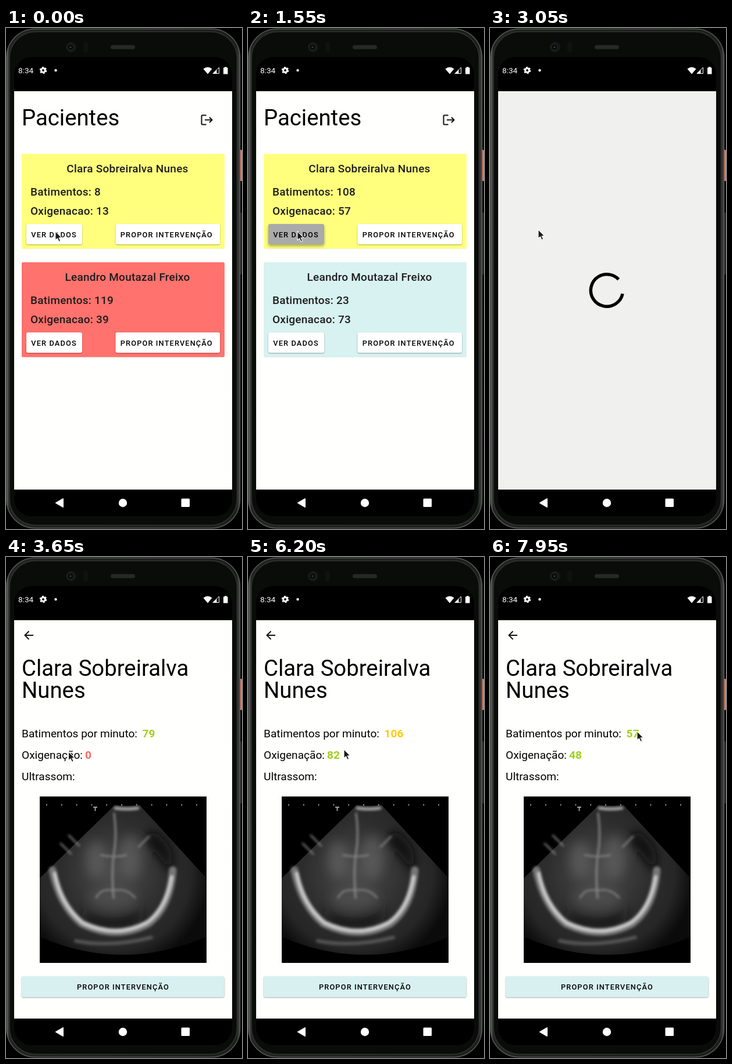
An HTML page for the animation above (8000 ms loop, 406 by 864 pixels).

```html
<!DOCTYPE html>
<html lang="pt">
<head>
<meta charset="utf-8">
<style>
  html, body { margin: 0; width: 100%; height: 100%; overflow: hidden; background: #000; }
  svg { display: block; }
  text { font-family: Roboto, sans-serif; white-space: pre; }
  .title { font-size: 38.3px; }
  .card text { font-size: 19px; font-weight: 500; letter-spacing: .23px; fill: #1d1d1d; }
  .card .button { font-size: 12.77px; letter-spacing: 1.14px; fill: #000; }
  .button { font-size: 12.77px; font-weight: 500; letter-spacing: 1.14px; }
  .detail { font-size: 19.1px; }
  .value { font-weight: 700; }
  .raised { filter: drop-shadow(0 1px 1px #0005); }
  .flat { filter: drop-shadow(0 .5px .7px #0003); }
  .line { fill: none; stroke: #111; stroke-width: 2; }
</style>
</head>
<body>
<svg width="406" height="864" viewBox="0 0 406 864">
  <defs>
    <clipPath id="screenClip"><rect x="14" y="109" width="375" height="687"/></clipPath>
    <clipPath id="photoClip"><rect x="58" y="413" width="287" height="287"/></clipPath>
    <linearGradient id="rim">
      <stop offset="0" stop-color="#6b6d6b"/><stop offset=".012" stop-color="#222422"/>
      <stop offset=".985" stop-color="#1c1e1c"/><stop offset="1" stop-color="#4a4c4a"/>
    </linearGradient>
    <radialGradient id="tissue" gradientUnits="userSpaceOnUse" cx="186" cy="545" r="165">
      <stop offset="0" stop-color="#4c4c4c"/><stop offset=".55" stop-color="#2d2d2d"/>
      <stop offset=".8" stop-color="#262626"/><stop offset="1" stop-color="#0b0b0b"/>
    </radialGradient>
    <filter id="soft" x="-40%" y="-40%" width="180%" height="180%"><feGaussianBlur stdDeviation="9"/></filter>
    <filter id="haze" x="-20%" y="-20%" width="140%" height="140%"><feGaussianBlur stdDeviation="2"/></filter>
  </defs>

  <!-- phone body -->
  <rect width="406" height="864"/>
  <rect x="401" y="210" width="5" height="54" rx="1.5" fill="#ed7660"/>
  <rect x="401" y="318" width="5" height="107" rx="1.5" fill="#232323"/>
  <rect x="1" y="1.5" width="401.5" height="861" rx="49" fill="url(#rim)" stroke="#555755" stroke-width="1.5"/>
  <rect x="6" y="6.5" width="391.5" height="851" rx="45" fill="#0a0c0a" stroke="#303230" stroke-width="1.5"/>
  <rect x="14" y="50" width="375" height="792" rx="30"/>
  <circle cx="112" cy="33" r="9" fill="#161716"/>
  <circle cx="111" cy="33" r="5.5" fill="#090a0c" stroke="#2c2d2e"/>
  <circle cx="111" cy="33" r="1.6" fill="#3b3d42"/>
  <rect x="133" y="24" width="8" height="18" rx="3" fill="#101110"/>
  <rect x="180" y="29.500" width="42" height="7" rx="3.500" fill="#272827"/>

  <!-- status and navigation bars -->
  <g fill="#fff">
    <text x="21" y="78" font-size="13.6">8:34</text>
    <circle cx="64" cy="73" r="3.4" fill="none" stroke="#fff" stroke-width="3"/>
    <circle cx="64" cy="73" r="5.3" fill="none" stroke="#fff" stroke-width="2" stroke-dasharray="2.8 2.75"/>
    <circle cx="85.500" cy="73" r="2.2"/>
    <path d="M339.500 70.500Q347 64.500 354.500 70.500L347 79.500Z"/>
    <path d="M356 78.500L366.500 68V78.500Z" fill="none" stroke="#fff"/>
    <path d="M355.500 79L362.500 72V79Z"/>
    <path d="M374 68.500h2v-1.500h3.500v1.500h2V79.500h-7.500Z"/>
    <path d="M86 819L98 812V826Z" stroke="#fff" stroke-width="2" stroke-linejoin="round"/>
    <circle cx="201" cy="819" r="7.2"/>
    <rect x="301.500" y="811.500" width="14.500" height="14.500" rx="1.5"/>
  </g>

  <g clip-path="url(#screenClip)">
    <rect x="14" y="109" width="375" height="687" fill="#f0f0ee"/>
    <circle id="spinner" cx="201" cy="452.500" r="27.700" fill="none" stroke="#000" stroke-width="5.5" pathLength="360"/>
    <g id="list"></g>
    <g id="details">
      <rect x="14" y="109" width="375" height="687" fill="#fffffd"/>
      <path class="line" d="M47 135H33M39.500 128L32.500 135L39.500 142"/>
      <text class="title" x="27" y="205">Clara Sobreiralva</text>
      <text class="title" x="27" y="243">Nunes</text>
      <g class="detail">
        <text x="27" y="310.500">Batimentos por minuto:</text>
        <text x="27" y="347.500">Oxigenação:</text>
        <text x="27" y="385">Ultrassom:</text>
        <text class="value" id="pulse" x="234.500" y="310.500"></text>
        <text class="value" id="oxygen" x="136" y="347.500"></text>
      </g>
      <g clip-path="url(#photoClip)">
        <rect x="58" y="413" width="287" height="287"/>
        <path d="M187 428L58 554V655Q200 717 345 655V554L230 428Q208 431 187 428Z" fill="url(#tissue)"/>
        <g filter="url(#soft)">
          <path d="M250 470Q298 500 282 545Q262 510 238 492Z" fill="#0a0a0a"/>
          <ellipse cx="155" cy="522" rx="18" ry="32" fill="#666" opacity=".6"/>
          <ellipse cx="214" cy="518" rx="20" ry="38" fill="#666" opacity=".6"/>
          <ellipse cx="184" cy="588" rx="42" ry="20" fill="#555" opacity=".6"/>
          <path d="M130 610Q185 640 240 606L225 632Q180 648 138 630Z" fill="#151515"/>
        </g>
        <g filter="url(#haze)" fill="none" stroke-linecap="round">
          <path d="M80 540Q92 600 130 632Q190 662 245 632Q282 604 287 540" stroke="#777" stroke-width="13"/>
          <path d="M84 546Q94 600 132 631Q190 659 243 630Q276 606 285 552" stroke="#c9c9c9" stroke-width="6"/>
          <path d="M120 662Q180 674 250 656" stroke="#555" stroke-width="6"/>
          <path d="M186 442Q191 480 186 510T185 588" stroke="#8a8a8a" stroke-width="3"/>
          <path d="M163 514Q186 519 207 514M155 588Q163 571 184 575Q208 570 222 588M94 494L112 512M108 480L126 498M228 500L246 482" stroke="#858585" stroke-width="2.5"/>
          <path d="M188 433Q208 436 227 433" stroke="#aaa" stroke-width="5"/>
        </g>
        <path d="M69 427.500H340" stroke="#aaa" stroke-width="2" stroke-dasharray="2 23.800"/>
        <path d="M150 431.500H157M153.500 431.500V438" stroke="#aaa" stroke-width="1.8"/>
      </g>
      <rect class="raised" x="27" y="723" width="348.500" height="36" rx="3" fill="#d8f1f0"/>
      <text class="button" x="201.500" y="745.500" text-anchor="middle">PROPOR INTERVENÇÃO</text>
    </g>
  </g>
  <path id="cursor" d="M0 0V15.500L3.500 12.300L6 18L8.700 16.800L6.200 11.200H10.800Z" fill="#1a1a1a" stroke="#fff" stroke-width="1.1" stroke-linejoin="round"/>
</svg>

<script>
const LOOP = 8000, STEP = 50;
const GREEN = '#a0d11a', YELLOW = '#ffc90e', RED = '#f86a62';
const $ = id => document.getElementById(id);
const clamp = v => Math.min(1, Math.max(0, v));
const ease = v => v * v * (3 - 2 * v);

const button = (x, width, label) => `
  <rect class="raised" x="${x}" y="338" width="${width}" height="35" rx="3" fill="#fff"/>
  <text class="button" x="${x + 8.3}" y="360.5">${label}</text>`;

const card = (id, y, name) => `
  <g class="card" id="${id}" transform="translate(0 ${y})">
    <rect class="flat" x="27" y="217" width="349" height="163.500" rx="2.500"/>
    <text x="209" y="248.500" text-anchor="middle">${name}</text>
    <text x="42" y="288.800"></text>
    <text x="42" y="321.500"></text>
    ${button(35, 96, 'VER DADOS')}${button(188.5, 179.5, 'PROPOR INTERVENÇÃO')}
  </g>`;

$('list').innerHTML = `
  <rect x="-30" y="60" width="470" height="790" fill="#fffffd"/>
  <text class="title" x="27" y="168">Pacientes</text>
  <path class="line" d="M344.500 150.500H338Q336.500 150.500 336.500 152V165Q336.500 166.500 338 166.500H344.500M342 158.500H354M350 154L354.500 158.500L350 163"/>
  ${card('first', 0, 'Clara Sobreiralva Nunes')}
  ${card('second', 187, 'Leandro Moutazal Freixo')}`;

const pressed = $('first').querySelectorAll('rect')[1];

// Cursor path: time, x, y
const path = [
  [0, 85, 350.5], [2200, 85, 350.5], [2400, 83, 347.5], [3400, 83, 347.5],
  [3650, 107.5, 335.5], [4000, 148, 325], [4100, 148, 325], [4650, 142, 349],
  [4750, 142, 349], [5300, 140, 347], [5800, 140, 347], [6000, 127, 436],
  [6200, 165, 331.5], [6400, 260, 254], [6650, 296, 320], [6850, 200, 361],
  [7050, 98, 300], [7250, 180, 213], [7400, 295, 262], [7550, 153, 345],
  [7950, 253, 300.5], [8000, 253, 300.5]
];

// Readings on the details screen: start, pulse, colour, oxygen, colour
const readings = [
  [0, 79, GREEN, 0, RED], [4150, 64, GREEN, 71, GREEN],
  [4800, 106, YELLOW, 82, GREEN], [7100, 57, GREEN, 48, GREEN]
];

function fillCard(id, colour, pulse, oxygen) {
  const [, pulseText, oxygenText] = $(id).querySelectorAll('text');
  $(id).querySelector('rect').setAttribute('fill', colour);
  pulseText.textContent = 'Batimentos: ' + pulse;
  oxygenText.textContent = 'Oxigenacao: ' + oxygen;
}

function fillValue(id, value, colour) {
  $(id).textContent = value;
  $(id).setAttribute('fill', colour);
}

function drawList(t) {
  const list = $('list');
  const scale = 1 + Math.max(0, t - 2040) * .00088;
  list.style.display = t < 2160 ? '' : 'none';
  list.setAttribute('opacity', clamp(1 - (t - 2060) / 100));
  list.setAttribute('transform',
    t < 2050 ? '' : `translate(201.5 452.5) scale(${scale}) translate(-201.5 -452.5)`);
  fillCard('first', '#ffff7d', ...(t < 500 ? [8, 13] : [108, 57]));
  fillCard('second', ...(t < 550 ? ['#ff726d', 119, 39] : ['#d8f1f1', 23, 73]));

  const press = clamp((t - 1300) / 250) * clamp(1 - (t - 2050) / 120);
  const grey = 255 - 85 * press;
  pressed.setAttribute('fill', `rgb(${grey},${grey},${grey})`);
  pressed.style.filter = `drop-shadow(0 ${1 + 2 * press}px ${1 + 1.5 * press}px #0005)`;
}

function drawSpinner(t) {
  const turns = (t - 2384) / 1332, cycle = Math.floor(turns), p = turns - cycle;
  const head = ease(clamp(2 * p)), tail = ease(clamp(2 * p - 1));
  const start = 12 + .219 * (t - 3050) + 295 * (cycle + tail);
  const spinner = $('spinner');
  spinner.style.display = t >= 2150 && t < 3150 ? '' : 'none';
  spinner.setAttribute('stroke-dasharray', `${10 + 295 * (head - tail)} 360`);
  spinner.setAttribute('transform', `rotate(${start} 201 452.5)`);
}

function drawDetails(t) {
  const [, pulse, pulseColour, oxygen, oxygenColour] = readings.findLast(r => r[0] <= t);
  $('details').setAttribute('opacity', clamp((t - 3075) / 50));
  fillValue('pulse', pulse, pulseColour);
  fillValue('oxygen', oxygen, oxygenColour);
}

function drawCursor(t) {
  const i = path.findIndex(point => point[0] > t);
  const [t0, x0, y0] = path[i - 1], [t1, x1, y1] = path[i];
  const k = (t - t0) / (t1 - t0);
  $('cursor').setAttribute('transform', `translate(${x0 + (x1 - x0) * k} ${y0 + (y1 - y0) * k})`);
}

function frame() {
  const t = Math.floor(performance.now() % LOOP / STEP) * STEP;
  drawList(t);
  drawSpinner(t);
  drawDetails(t);
  drawCursor(t);
  requestAnimationFrame(frame);
}
frame();
</script>
</body>
</html>
```
